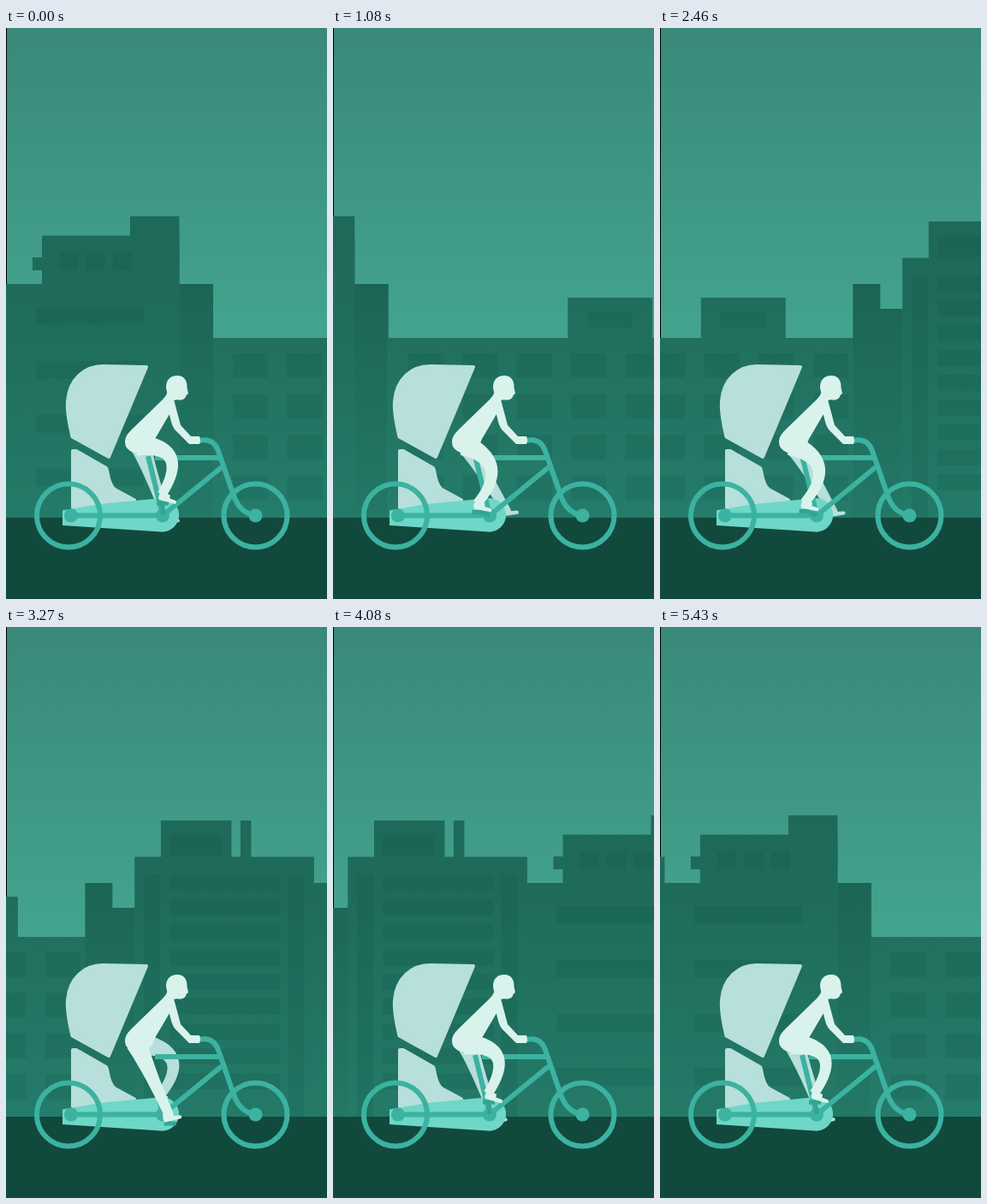
An HTML page that plays this animation: 375 px wide and 667 px high, repeating every 5.46 s.

```html
<!DOCTYPE html>
<html lang="en">
<head>
<meta charset="utf-8">
<title>Pedicab ride</title>
<style>
  html, body { margin: 0; width: 100%; height: 100%; overflow: hidden; background: #12493d; }
  svg { display: block; width: 100vw; height: 100vh; }
  .bike { fill: none; stroke: #3cb2a1; stroke-width: 6; stroke-linejoin: round; }
  .hub { fill: #3cb2a1; }
  .pale { fill: #b7dfdc; }
  .rider { fill: #d9f3ec; }
  .window { fill: #0c4a40; fill-opacity: .15; }
</style>
</head>
<body>
<svg viewBox="0 0 375 667" preserveAspectRatio="none">
  <defs>
    <linearGradient id="sky" gradientUnits="userSpaceOnUse" x1="0" y1="0" x2="0" y2="362">
      <stop offset="0" stop-color="#39897a"/>
      <stop offset="1" stop-color="#43a48f"/>
    </linearGradient>
    <linearGradient id="wall" gradientUnits="userSpaceOnUse" x1="0" y1="220" x2="0" y2="572">
      <stop offset="0" stop-color="#1e6959"/>
      <stop offset=".3" stop-color="#1f6c5c"/>
      <stop offset="1" stop-color="#247a68"/>
    </linearGradient>
    <linearGradient id="low" gradientUnits="userSpaceOnUse" x1="0" y1="315" x2="0" y2="572">
      <stop offset="0" stop-color="#206d5d"/>
      <stop offset="1" stop-color="#257c6a"/>
    </linearGradient>
    <linearGradient id="shade" gradientUnits="userSpaceOnUse" x1="0" y1="299" x2="0" y2="572">
      <stop offset="0" stop-color="#1c6555"/>
      <stop offset="1" stop-color="#237866"/>
    </linearGradient>
  </defs>

  <rect width="375" height="572" fill="url(#sky)"/>
  <rect width="1" height="572" fill="#000"/>
  <g id="scroll">
    <g id="city"></g>
    <use href="#city" x="896"/>
  </g>
  <rect y="572" width="375" height="95" fill="#12493d"/>

  <!-- cabin -->
  <g class="pale" stroke="#b7dfdc" stroke-width="4" stroke-linejoin="round">
    <path d="M164 396 L120 501 L77.500 477.500 C74 463 71 449 72 436 C74 410 92 395 113 395Z"/>
    <path d="M78 494 L82 494 L117 514 C120 519 118 531 127 539 L150 551.500 L110 556 L78 560Z"/>
  </g>

  <g class="pale"><path id="farLeg"/><path id="farFoot"/></g>
  <path fill="#6fd7c7" d="M66 563.500 L110 556 L181 549.300 A19.700 19.700 0 1 1 181 588.600 L66 581Z"/>

  <!-- frame -->
  <g class="bike">
    <circle cx="73" cy="569.500" r="37"/>
    <circle cx="291.500" cy="569.500" r="37"/>
    <path d="M76 569.500 H183 L252 513 M166 500 L183 569 M174 502 H250"/>
    <path d="M226 482 C239 479 245 486 248 494 L266 546 C270 558 277 567 291 569.500"/>
  </g>
  <g class="hub">
    <circle cx="76" cy="569.500" r="8"/>
    <circle cx="291.500" cy="569.500" r="8"/>
    <circle cx="183" cy="569.500" r="8"/>
  </g>
  <path id="crank" fill="none" stroke="#35a393" stroke-width="5"/>

  <!-- rider -->
  <g class="rider">
    <path id="nearLeg"/><path id="nearFoot"/>
    <path d="M139 484 C139 476 144 472 149 467 L183 434 Q187 430 189 425 L205 433 Q200 434 196 435
             L194 446 L174 480 Q170 492 162 496 L149 496 Q139 492 139 484Z"/>
    <path d="M187 436 L196 434 L204 464 L216 477 L226 477 Q228 482 226 486 L214 486 L198 470 Q195 467 193 460Z"/>
    <path d="M187 420 C187 411 192 406 200 406 C208 406 212 412 211.500 420 L213 427 L210.500 429
             C210 433 206 435 201 434.500 L189 430Z"/>
  </g>
</svg>
<script>
const LOOP = 5460, STEP = 30, CITY = 896, TURNS = 4;
const HUB = { x: 183, y: 569 }, CRANK = 14;
const THIGH = 42, SHIN = 44;
const $ = id => document.getElementById(id);

function block(x1, x2, top, fill = "wall", bottom = 572) {
  return `<rect x="${x1}" y="${top}" width="${x2 - x1}" height="${bottom - top}" fill="url(#${fill})"/>`;
}

function windows(x, y, w, h, cols = 1, rows = 1, dx = 0, dy = 0) {
  let out = "";
  for (let r = 0; r < rows; r++)
    for (let c = 0; c < cols; c++)
      out += `<rect class="window" x="${x + c * dx}" y="${y + r * dy}" width="${w}" height="${h}"/>`;
  return out;
}

$("city").innerHTML = [
  // stepped block
  block(0, 202.5, 299),
  block(202, 242, 299, "shade"),
  block(42, 202.5, 242.5),
  block(145, 202.5, 220),
  block(31, 43, 268, "wall", 283),
  windows(62, 262, 22, 21, 3, 1, 31.500),
  windows(35, 326, 126, 21, 1, 4, 0, 63),
  // low block with a raised box
  block(242, 630, 362, "low"),
  block(451.5, 550.5, 315, "low", 363),
  windows(475, 332, 52, 18),
  windows(265, 380, 41, 29, 6, 4, 63.500, 47.500),
  // narrow pair
  block(629, 661, 299, "shade"),
  block(660, 688, 328, "shade"),
  // office tower
  block(686.800, 896.500, 268.500),
  block(717.500, 800, 226, "wall", 270),
  block(810.500, 823, 226, "wall", 270),
  windows(728, 243, 60, 25),
  windows(697.500, 289, 19, 283),
  windows(866, 289, 19, 283),
  windows(728, 289, 129, 19, 1, 9, 0, 29)
].join("");

// Knee position from hip and ankle, bending forward.
function kneeOf(hip, ankle) {
  const dx = ankle.x - hip.x, dy = ankle.y - hip.y, d = Math.hypot(dx, dy);
  const along = (THIGH ** 2 - SHIN ** 2 + d * d) / (2 * d);
  const out = Math.sqrt(Math.max(0, THIGH ** 2 - along ** 2));
  return { x: hip.x + (dx * along + dy * out) / d, y: hip.y + (dy * along - dx * out) / d };
}

// Tapered limb along a curve through the knee.
function limb(hip, ankle) {
  const knee = kneeOf(hip, ankle);
  const bend = k => 2 * knee[k] - (hip[k] + ankle[k]) / 2;
  const c = { x: bend("x"), y: bend("y") };
  const left = [], right = [];
  for (let i = 0; i <= 20; i++) {
    const u = i / 20, v = 1 - u;
    const at = k => v * v * hip[k] + 2 * u * v * c[k] + u * u * ankle[k];
    const slope = k => v * (c[k] - hip[k]) + u * (ankle[k] - c[k]);
    const x = at("x"), y = at("y"), sx = slope("x"), sy = slope("y");
    const w = (5.5 + 3 * v + 4 * v ** 3) / Math.hypot(sx, sy);
    left.push(`${(x + sy * w).toFixed(2)} ${(y - sx * w).toFixed(2)}`);
    right.unshift(`${(x - sy * w).toFixed(2)} ${(y + sx * w).toFixed(2)}`);
  }
  return "M" + left.concat(right).join("L") + "Z";
}

function poseLeg(name, turn, hip, shift) {
  const a = turn * 2 * Math.PI, sin = Math.sin(a), cos = Math.cos(a);
  const pedal = { x: HUB.x + CRANK * sin + shift, y: HUB.y - CRANK * cos };
  const tilt = 6 + 14 * cos - 6 * sin;
  $(name + "Leg").setAttribute("d", limb(hip, { x: pedal.x - 1, y: pedal.y - 10 }));
  const foot = $(name + "Foot");
  foot.setAttribute("d", "M-7 -12 L5 -12 L6 -8 L13 -8 Q16 -7 14 -4 L-5 -2.500 Q-7 -3 -7 -6Z");
  foot.setAttribute("transform", `translate(${pedal.x} ${pedal.y}) rotate(${tilt})`);
  return pedal;
}

function draw(ms) {
  const t = Math.floor((ms % LOOP) / STEP) * STEP / LOOP;
  $("scroll").setAttribute("transform", `translate(${-CITY * t} 0)`);
  const turn = t * TURNS;
  poseLeg("far", turn + .5, { x: 157, y: 487 }, 6);
  const p = poseLeg("near", turn, { x: 153, y: 487 }, 0);
  $("crank").setAttribute("d", `M${HUB.x} ${HUB.y}L${p.x} ${p.y}M${p.x - 7} ${p.y}h14`);
}

const start = performance.now();
function tick() {
  draw(performance.now() - start);
  requestAnimationFrame(tick);
}
tick();
</script>
</body>
</html>
```
